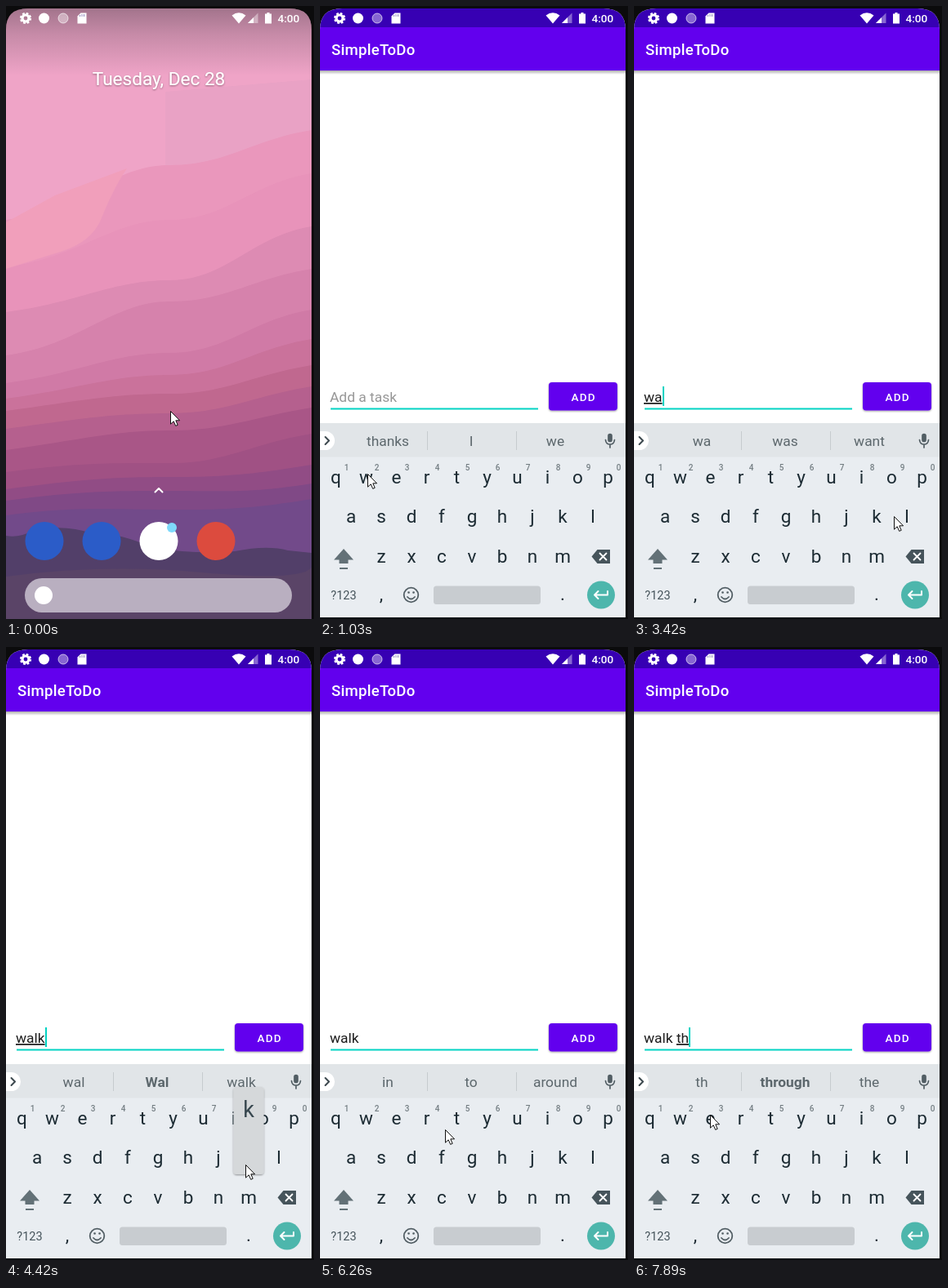
Write an HTML page that moves like this. It is 377 by 751 pixels and loops after 8 s.

```html
<!DOCTYPE html>
<html lang="en">
<head>
<meta charset="utf-8">
<title>To-do typing</title>
<style>
  html, body { margin: 0; width: 100%; height: 100%; overflow: hidden; background: #0b0b0c; }
  svg { display: block; width: 377px; height: 751px; }
  text { font-family: Roboto, sans-serif; white-space: pre; }
  .mid { text-anchor: middle; }
  .key { font-size: 22.5px; fill: #1c2b33; }
  .digit { font-size: 10px; font-weight: 500; fill: #747e83; }
  .word { font-size: 17.4px; fill: #5c676c; }
  .field { font-size: 17.4px; }
  .line { fill: none; stroke-linecap: round; stroke-linejoin: round; }
</style>
</head>
<body>
<svg viewBox="0 0 377 751">
  <defs>
    <linearGradient id="shade" x2="0" y2="1">
      <stop offset="0" stop-color="#50404c" stop-opacity=".5"/>
      <stop offset=".4" stop-color="#50404c" stop-opacity=".26"/>
      <stop offset="1" stop-color="#50404c" stop-opacity="0"/>
    </linearGradient>
    <linearGradient id="drop" x2="0" y2="1">
      <stop offset="0" stop-opacity=".32"/>
      <stop offset="1" stop-opacity="0"/>
    </linearGradient>
    <filter id="soft" x="-30%" y="-30%" width="160%" height="160%">
      <feDropShadow dx="0" dy="1" stdDeviation="1.3" flood-opacity=".4"/>
    </filter>
    <clipPath id="screen"><path d="M0 751V29Q0 3 27 3H347Q374 3 374 29V751Z"/></clipPath>
  </defs>

  <g clip-path="url(#screen)">
    <g id="home">
      <rect width="377" height="751" fill="#efa4c7"/>
      <path d="M195 105L374 90V200H195Z" fill="#e9a2c5"/>
      <g id="bands"></g>
      <path d="M0 265L60 232 148 199Q132 222 116 262 105 288 70 300L0 322Z" fill="#f19fbb"/>
      <path d="M0 649Q16 652 32 643 70 634 105 646 140 645 180 664 235 672 280 668 320 660 345 667L374 670V751H0Z" fill="#523f69"/>
      <path d="M0 699Q120 683 240 694T374 688V751H0Z" fill="#5a4467"/>
      <rect width="377" height="85" fill="url(#shade)"/>
      <text class="mid" x="187" y="97" font-size="22.6" fill="#fff" filter="url(#soft)">Tuesday, Dec 28</text>
      <path class="line" d="M182.500 595.500l4.500-4.500 4.500 4.500" stroke="#fff" stroke-width="2"/>
      <circle cx="47" cy="655.500" r="23.500" fill="#2b5cc8"/>
      <circle cx="117" cy="655.500" r="23.500" fill="#2b5cc8"/>
      <circle cx="187" cy="655.500" r="23.500" fill="#fff"/>
      <circle cx="203" cy="639" r="6" fill="#7fd9fb"/>
      <circle cx="257" cy="655.500" r="23.500" fill="#dc4b3e"/>
      <rect x="23" y="701" width="327" height="42" rx="21" fill="#b9afc0"/>
      <circle cx="46" cy="722" r="11" fill="#fff"/>
    </g>

    <g id="app">
      <rect width="377" height="751" fill="#fff"/>
      <rect width="377" height="26" fill="#3700b3"/>
      <rect y="79" width="377" height="5" fill="url(#drop)"/>
      <rect y="26" width="377" height="53" fill="#6200ee"/>
      <text x="14" y="60" font-size="18.6" font-weight="500" letter-spacing=".25" fill="#fff">SimpleToDo</text>

      <rect x="13" y="492.500" width="254" height="2" fill="#03d3c3"/>
      <text id="hint" class="field" x="12" y="485" fill="#979797">Add a task</text>
      <text id="field" class="field" x="12" y="485" fill="#1c1c1c"><tspan id="done"></tspan><tspan id="composing" text-decoration="underline"></tspan></text>
      <rect id="caret" y="466" width="2" height="24" fill="#03d3c3"/>
      <rect x="280" y="461" width="84" height="34.500" rx="4" fill="#6200ee" filter="url(#soft)"/>
      <text class="mid" x="322.700" y="484" font-size="13.600" font-weight="500" letter-spacing="1.2" fill="#fff">ADD</text>

      <rect y="511" width="377" height="42" fill="#e1e5e8"/>
      <rect y="552.500" width="377" height="197" fill="#e9edf1"/>
      <rect y="749" width="377" height="2" fill="#111416"/>
      <path d="M131.500 521V544M240.500 521V544" stroke="#c6cbce"/>
      <rect x="-12" y="521" width="30" height="23" rx="11.500" fill="#fff"/>
      <path class="line" d="M6.500 528l4.500 4.500-4.500 4.500" stroke="#3b474d" stroke-width="2"/>
      <g stroke="#525e64" stroke-width="1.700" class="line">
        <rect x="353" y="524.500" width="4" height="9" rx="2" fill="#525e64"/>
        <path d="M349.500 531.500Q350 537 355 537T360.500 531.500M355 537V541"/>
      </g>
      <g id="words"></g>
      <g id="keys"></g>

      <path d="M29 665L41 678.500H34.500V683H23.500V678.500H17Z" fill="#637177"/>
      <rect x="24" y="688" width="10" height="2" fill="#637177"/>
      <path d="M332.500 674.500L339.500 666H355V683H339.500Z" fill="#46545b"/>
      <path class="line" d="M342.500 670.500l8 8m0-8l-8 8" stroke="#fff" stroke-width="1.800"/>
      <g class="line" stroke="#525e64" stroke-width="1.800">
        <circle cx="111.500" cy="721.500" r="8.800"/>
        <path d="M107 724Q111.500 729 116 724"/>
        <path d="M108.500 718.500h.1M114.500 718.500h.1" stroke-width="2.600"/>
      </g>
      <rect x="139" y="710.500" width="131" height="22.500" rx="3.500" fill="#c8ccd0"/>
      <circle cx="344" cy="721.500" r="17" fill="#4db6ac"/>
      <path class="line" d="M352 717V721.500H336.500M340.500 717l-4.500 4.500 4.500 4.500" stroke="#fff" stroke-width="2"/>

      <g id="popup">
        <rect x="-18.500" width="37" height="107" rx="4" fill="#d5d8da" filter="url(#soft)"/>
        <text id="popupKey" class="mid" y="37" font-size="27" fill="#37474f"></text>
        <path id="dots" d="M5.500 48h1.500m2 0h1.500m2 0h1.500" stroke="#37474f" stroke-width="1.500"/>
      </g>
    </g>

    <g fill="#fff">
      <circle cx="24" cy="15" r="4" fill="none" stroke="#fff" stroke-width="3.200"/>
      <circle cx="24" cy="15" r="6" fill="none" stroke="#fff" stroke-width="2.200" stroke-dasharray="2.700 2.012"/>
      <circle cx="46.500" cy="15" r="6.500"/>
      <circle cx="70" cy="15" r="6" fill-opacity=".4" stroke="#fff" stroke-opacity=".65"/>
      <path d="M91.500 8.500H98.500V21.500H87.500V12.500Z"/>
      <path d="M90.500 13v-2m2.500 2v-3m2.500 3v-3" stroke="#4a3a90" stroke-opacity=".6"/>
      <path d="M276.500 11.500Q285 5 293.500 11.500L285 21.500Z"/>
      <path d="M308.500 8.500V21H296Z" fill-opacity=".4"/>
      <path d="M303 14V21H296Z"/>
      <path d="M319.500 8h3v1.500h2.500V21.500H317V9.500h2.500Z"/>
      <text x="332.500" y="20" font-size="13.600" font-weight="500">4:00</text>
    </g>
  </g>
  <path id="pointer" d="M.5.5V16.200L4.200 12.800 6.700 18.400 9.200 17.300 6.800 11.800H11.600Z" fill="#fff" stroke="#111" stroke-width="1"/>
</svg>

<script>
const LOOP = 8000, APP_OPENS = 1030;
const $ = id => document.getElementById(id);
const add = (parent, tag, attrs, text = '') => {
  const node = document.createElementNS('http://www.w3.org/2000/svg', tag);
  for (const name in attrs) node.setAttribute(name, attrs[name]);
  node.textContent = text;
  parent.append(node);
  return node;
};

// Wallpaper layers: left edge, bend, right edge, colour
[
  [262, 195, 152, '#ea97bc'], [320, 262, 205, '#e893ba'], [375, 336, 270, '#dd8bb3'],
  [428, 362, 322, '#d682ac'], [462, 425, 372, '#d07aa6'], [481, 452, 408, '#ca729b'],
  [496, 475, 440, '#c0688f'], [518, 499, 466, '#b5608e'], [544, 520, 492, '#a95687'],
  [571, 560, 524, '#a05184'], [592, 577, 562, '#914c85'], [606, 594, 585, '#804986'],
  [624, 617, 604, '#724a8a']
].forEach(([left, bend, right, fill]) => add($('bands'), 'path', {
  d: `M0 ${left}C90 ${left - 12} 130 ${bend} 200 ${bend}S300 ${right + 12} 374 ${right}V751H0Z`, fill
}));

const keyAt = {};
[['qwertyuiop', 19.5, 585], ['asdfghjkl', 38, 633], ['zxcvbnm', 75, 681.5]].forEach(([row, x0, y], r) =>
  [...row].forEach((key, i) => {
    const x = x0 + 37 * i;
    keyAt[key] = [x, y];
    add($('keys'), 'text', { class: 'key mid', x, y }, key);
    if (r === 0) add($('keys'), 'text', { class: 'digit mid', x: x + 13, y: 569 }, (i + 1) % 10);
  }));
add($('keys'), 'text', { class: 'mid', x: 29, y: 727, 'font-size': 14.5, fill: '#46545b' }, '?123');
add($('keys'), 'text', { class: 'key mid', x: 75, y: 728 }, ',');
add($('keys'), 'text', { class: 'key mid', x: 297, y: 728 }, '.');
const slots = [83, 185, 288].map(x => add($('words'), 'text', { class: 'word mid', x, y: 539 }));

// Step tables: [start time, ...state]
const pointer = [
  [0, 201, 496], [260, 290, 624], [380, 400, 760], [1030, 58, 573], [1150, 60, 574], [1300, 61, 574],
  [1710, 58, 580], [1840, 44, 600], [1960, 31, 620], [2770, 38, 622], [2920, 92, 634],
  [3040, 172, 634], [3170, 250, 632], [3300, 303, 628], [3420, 318, 625], [3840, 314, 627],
  [3960, 305, 629], [4110, 303, 629], [4420, 293, 634], [4560, 264, 670], [4690, 223, 704],
  [4850, 200, 730], [4990, 199, 731], [5360, 202, 730], [5480, 201, 724], [6010, 188, 680],
  [6140, 167, 622], [6260, 153, 591], [6410, 160, 586], [6530, 163, 584], [6940, 192, 599],
  [7100, 204, 610], [7240, 213, 617], [7370, 214, 619], [7630, 114, 576], [7770, 93, 573]
];
const typed = [
  [0, '', ''], [2100, '', 'w'], [2510, '', 'wa'], [3840, '', 'wal'], [4420, '', 'walk'],
  [5890, 'walk ', ''], [6940, 'walk ', 't'], [7770, 'walk ', 'th']
];
const caret = [
  [0, 0], [2100, 1], [3040, 0], [3420, 1], [4280, 0], [4420, 1], [4850, 0],
  [5360, 1], [6260, 0], [6940, 1], [7370, 0], [7770, 1]
];
const pressed = [
  [0, ''], [1580, 'w'], [2100, ''], [2360, 'a'], [2770, ''], [3700, 'l'], [3960, ''],
  [4420, 'k'], [4560, ''], [6940, 't'], [7100, ''], [7240, 'h'], [7770, '']
];
// A leading * marks the bold suggestion
const suggestions = [
  [0, 'thanks I we'], [2240, 'w we what'], [2640, 'wa was want'], [3960, 'wal *Wal walk'],
  [4560, 'walk walking walks'], [6010, 'in to around'], [7100, 't the through'], [7890, 'th *through the']
];
const stateAt = (steps, t) => steps.findLast(step => step[0] <= t).slice(1);
const show = (id, on) => $(id).setAttribute('visibility', on ? 'inherit' : 'hidden');

function draw(t) {
  show('home', t < APP_OPENS);
  show('app', t >= APP_OPENS);
  $('pointer').setAttribute('transform', `translate(${stateAt(pointer, t)})`);

  const [done, composing] = stateAt(typed, t);
  $('done').textContent = done;
  $('composing').textContent = composing;
  show('hint', !(done + composing));
  $('caret').setAttribute('x', Math.round(12 + $('field').getComputedTextLength()));
  show('caret', stateAt(caret, t)[0]);

  const [key] = stateAt(pressed, t);
  show('popup', key);
  if (key) {
    const [x, y] = keyAt[key];
    $('popup').setAttribute('transform', `translate(${x} ${y - 94})`);
    $('popupKey').textContent = key;
    show('dots', 'wat'.includes(key));
  }

  stateAt(suggestions, t)[0].split(' ').forEach((word, i) => {
    slots[i].textContent = word.replace('*', '');
    slots[i].setAttribute('font-weight', word[0] === '*' ? 700 : 400);
  });
}

const start = performance.now();
function tick() {
  draw((performance.now() - start) % LOOP);
  requestAnimationFrame(tick);
}
tick();
</script>
</body>
</html>
```
